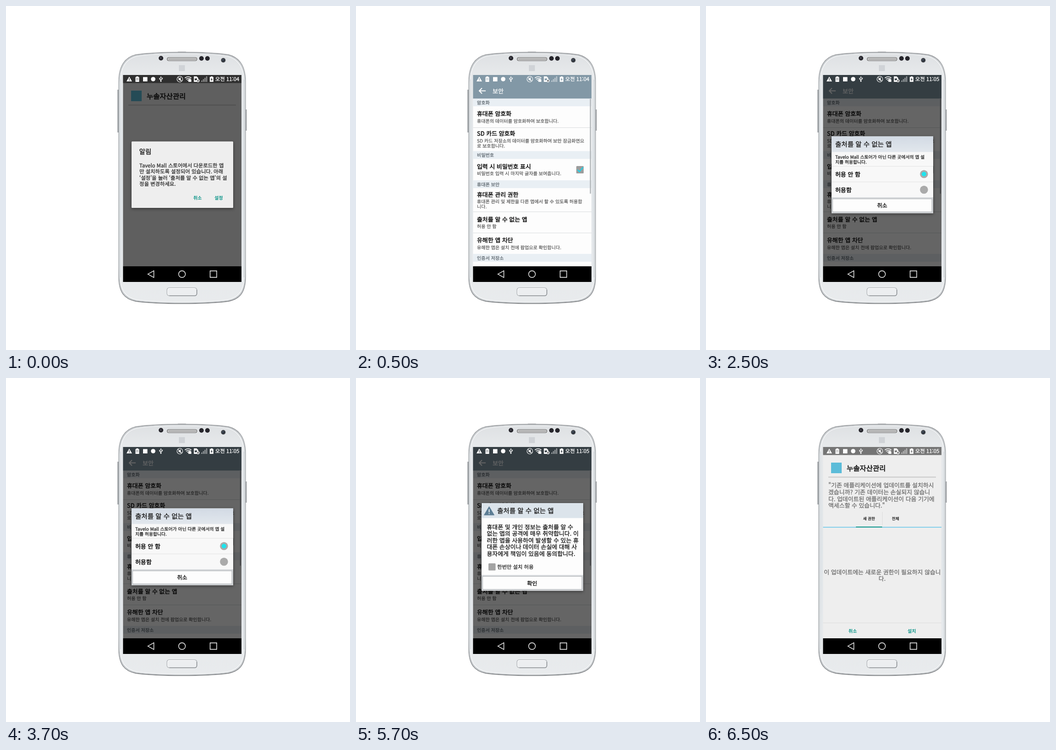
These frames come from a looping animation (748 by 748 pixels, 8 s). An HTML page:

```html
<!DOCTYPE html>
<html lang="ko">
<head>
<meta charset="utf-8">
<title>설치 안내</title>
<style>
html, body { margin: 0; width: 100%; height: 100%; overflow: hidden; background: #fff; }
svg { display: block; width: 100%; height: 100%; }
/* a thin stroke gives the regular weight a medium look */
text {
  font: 400 10.05px "Noto Sans CJK KR", "Noto Sans CJK", sans-serif;
  fill: var(--ink); stroke: var(--ink); stroke-width: .15px;
  text-rendering: geometricPrecision; --ink: #484848;
}
.mid { text-anchor: middle; }
.item { font-size: 12.9px; --ink: #080808; stroke-width: .45px; }
.sec { --ink: #59636b; stroke-width: .25px; }
.head { font-size: 14.5px; --ink: #1c1c1c; stroke-width: .35px; }
.note { font-size: 11.3px; --ink: #2c2c2c; stroke-width: .3px; }
.small { font-size: 9.8px; --ink: #222; stroke-width: .3px; }
.body { font-size: 12.9px; --ink: #1c1c1c; stroke-width: .35px; }
.soft { font-size: 12.85px; --ink: #6c6c6c; stroke-width: .3px; }
.btn { font-size: 12px; --ink: #111; stroke-width: .4px; }
.act { font-size: 10px; font-weight: 700; --ink: #0f968a; stroke: none; }
.tab { font-size: 8.6px; font-weight: 700; --ink: #222; stroke: none; }
.app { font-size: 15.4px; --ink: #161616; stroke-width: .6px; }
.title { font-size: 13px; --ink: #fff; stroke-width: .3px; }
.clock { font-size: 11.3px; --ink: #fff; stroke-width: .3px; }
.box { filter: drop-shadow(0 2px 3px rgba(0,0,0,.45)); }

/* each part is switched on and off in hard steps */
.show { animation: 8s step-end infinite; }
.installer { animation-name: installer; }
.details { animation-name: details; }
.settings { animation-name: settings; }
.dim { animation-name: dim; }
.blocked { animation-name: blocked; }
.choose { animation-name: choose; }
.confirm { animation-name: confirm; }
.early { animation-name: early; }
.late { animation-name: late; }
@keyframes installer { 0% { visibility: visible } 6.25% { visibility: hidden } 81.25%, 100% { visibility: visible } }
@keyframes details { 0% { visibility: hidden } 81.25%, 100% { visibility: visible } }
@keyframes settings { 0% { visibility: hidden } 6.25% { visibility: visible } 81.25%, 100% { visibility: hidden } }
@keyframes dim { 0% { visibility: visible } 6.25% { visibility: hidden } 31.25% { visibility: visible } 81.25%, 100% { visibility: hidden } }
@keyframes blocked { 0% { visibility: visible } 6.25%, 100% { visibility: hidden } }
@keyframes choose { 0% { visibility: hidden } 31.25% { visibility: visible } 56.25%, 100% { visibility: hidden } }
@keyframes confirm { 0% { visibility: hidden } 56.25% { visibility: visible } 81.25%, 100% { visibility: hidden } }
@keyframes early { 0% { visibility: visible } 31.25%, 100% { visibility: hidden } }
@keyframes late { 0% { visibility: hidden } 31.25%, 100% { visibility: visible } }
</style>
</head>
<body>
<svg viewBox="0 0 748 748">
<defs>
  <linearGradient id="shell" x2="0" y2="1">
    <stop offset="0" stop-color="#dfe1e4"/><stop offset=".08" stop-color="#e9ebed"/>
    <stop offset=".5" stop-color="#e2e7eb"/><stop offset="1" stop-color="#eceef0"/>
  </linearGradient>
  <linearGradient id="rim" x2="0" y2="1">
    <stop offset="0" stop-color="#909295"/><stop offset=".12" stop-color="#a4a8ac"/>
    <stop offset=".85" stop-color="#a4a8ac"/><stop offset="1" stop-color="#6a6d70"/>
  </linearGradient>
  <linearGradient id="bar" x2="0" y2="1">
    <stop offset="0" stop-color="#d2dae4"/><stop offset="1" stop-color="#e2e7ed"/>
  </linearGradient>
  <pattern id="grain" width="3" height="3" patternUnits="userSpaceOnUse">
    <path d="M0 0h1v1h-1zM1.5 1.5h1v1h-1z" fill="#d3d7db" opacity=".6"/>
  </pattern>
  <pattern id="mesh" width="3" height="3" patternUnits="userSpaceOnUse" x="353" y="114">
    <circle cx="1.5" cy="1.5" r="1" fill="#666"/>
  </pattern>
  <path id="body" d="M245 165C245 130 258 112 282 106C312 101.500 346 100.500 382 100.500C420 100.500 454 101.500 484 106C508 112 521 130 521 165V588C521 622 509 637 484 642C454 646 420 647 382 647C346 647 312 646 282 642C257 637 245 622 245 588Z"/>
  <clipPath id="screen"><rect x="254.500" y="150" width="257.500" height="416"/></clipPath>
</defs>

<!-- phone -->
<path d="M242.500 182h2.500v93h-2.500zM521 225h2.200v46h-2.200z" fill="#8b8f93"/>
<path d="M372 101l2-1.500h17l2 1.500z" fill="#8b8f93"/>
<use href="#body" fill="url(#shell)" stroke="url(#rim)" stroke-width="1.300"/>
<use href="#body" fill="none" stroke="#c3c7ca" stroke-width="1.800" transform="translate(383 374) scale(.989 .994) translate(-383 -374)"/>
<use href="#body" fill="url(#grain)" stroke="#f8f9fa" stroke-width="1.200" transform="translate(383 374) scale(.977 .988) translate(-383 -374)"/>
<path d="M249 160V590M517.500 160V590" stroke="#cdd3d8" fill="none"/>
<rect x="350.500" y="112" width="64.500" height="7" rx="3.500" fill="#d4d4d4" stroke="#626262" stroke-width="1.200"/>
<rect x="353" y="114" width="60" height="3" fill="url(#mesh)"/>
<g fill="#26252b">
  <circle cx="337" cy="113.500" r="5"/><circle cx="425" cy="114" r="5"/><circle cx="438" cy="114" r="5"/>
</g>
<circle cx="336.500" cy="113" r="2" fill="#4a4a52"/>
<circle cx="472.500" cy="118" r="5" fill="#43474d"/><circle cx="472.500" cy="118" r="2.600" fill="#1c2029"/>
<circle cx="472" cy="117.500" r="1.200" fill="#6b7d92"/>
<rect x="376" y="128.500" width="13" height="13" fill="#d0d3d7"/>
<rect x="350" y="612.500" width="65" height="17.500" rx="5" fill="#eceef0" stroke="#a9adb1" stroke-width="1.200"/>
<path d="M353 628.500q-1.500-1-1.500-4v-7q0-3.500 3.500-3.500h55" fill="none" stroke="#fff"/>
<path d="M355 630h56q4 0 4-5v-8" fill="none" stroke="#777b7f"/>

<!-- screens -->
<g clip-path="url(#screen)">
  <g class="show installer">
    <rect x="254" y="150" width="258" height="416" fill="#eee"/>
    <rect x="254" y="150" width="258" height="17.500" fill="#757575"/>
    <rect x="272" y="184" width="23" height="23" fill="#5cbcd9"/>
    <text class="app" x="306" y="201.500">누솔자산관리</text>
    <path d="M266 215.500H500" stroke="#c9c9c9" stroke-width="2"/>
  </g>
  <g class="show details">
    <text class="soft" x="266" y="238.200">"기존 애플리케이션에 업데이트를 설치하시</text>
    <text class="soft" x="266" y="252.900">겠습니까? 기존 데이터는 손실되지 않습니</text>
    <text class="soft" x="266" y="267.600">다. 업데이트된 애플리케이션이 다음 기기에</text>
    <text class="soft" x="266" y="282.300">액세스할 수 있습니다."</text>
    <text class="tab mid" x="354.500" y="309">새 권한</text>
    <text class="tab mid" x="412" y="309">전체</text>
    <path d="M383.500 291v29M254 532.500h258" stroke="#dcdcdc"/>
    <path d="M254 324.500h258" stroke="#5fc4e8" stroke-width="1.300"/>
    <path d="M326 324h57" stroke="#17998c" stroke-width="2"/>
    <text class="soft mid" x="383.500" y="426.500">이 업데이트에는 새로운 권한이 필요하지 않습니</text>
    <text class="soft mid" x="383" y="441.200">다.</text>
    <text class="act mid" x="319" y="553.500">취소</text>
    <text class="act mid" x="447.500" y="553.500">설치</text>
  </g>

  <g class="show settings">
    <rect x="254" y="150" width="258" height="416" fill="#fdfdfd"/>
    <rect x="254" y="150" width="258" height="51.500" fill="#8298a6"/>
    <path d="M282 184.500h-14M274 178.500l-6 6l6 6" fill="none" stroke="#fff" stroke-width="2"/>
    <text class="title" x="297" y="189.500">보안</text>
    <path d="M254 201.500h258v16.500h-258zM254 315.500h258v17h-258zM254 379h258v17h-258zM254 539h258v17h-258z" fill="#e9eff4"/>
    <path d="M254 264.500h258M254 447.500h258M254 493.500h258" stroke="#d9dcde"/>
    <text class="sec" x="263" y="213.700">암호화</text>
    <text class="item" x="263" y="239.200">휴대폰 암호화</text>
    <text x="263" y="253.700">휴대폰의 데이터를 암호화하여 보호합니다.</text>
    <text class="item" x="263" y="282.200">SD 카드 암호화</text>
    <text x="263" y="296.500">SD 카드 저장소의 데이터를 암호화하여 보안 잠금화면으</text>
    <text x="263" y="307.700">로 보호합니다.</text>
    <text class="sec" x="263" y="328">비밀번호</text>
    <text class="item" x="263" y="354">입력 시 비밀번호 표시</text>
    <text x="263" y="368.300">비밀번호 입력 시 마지막 글자를 보여줍니다.</text>
    <rect x="479" y="348" width="16" height="16" rx="1.500" fill="#9d9d9d"/>
    <path d="M481.500 356l4.300 4.300l8-9.500" fill="none" stroke="#1fd3e8" stroke-width="2.300"/>
    <text class="sec" x="263" y="391.500">휴대폰 보안</text>
    <text class="item" x="263" y="414.500">휴대폰 관리 권한</text>
    <text x="263" y="428.700">휴대폰 관리 및 제한을 다른 앱에서 할 수 있도록 허용합</text>
    <text x="263" y="440.300">니다.</text>
    <text class="item" x="263" y="469">출처를 알 수 없는 앱</text>
    <text x="263" y="483.300">허용 안 함</text>
    <text class="item" x="263" y="514.300">유해한 앱 차단</text>
    <text x="263" y="528.500">유해한 앱은 설치 전에 팝업으로 확인합니다.</text>
    <text class="sec" x="263" y="552">인증서 저장소</text>
    <rect x="508.500" y="202" width="2.500" height="206" fill="#b4b8bb"/>
  </g>

  <rect class="show dim" x="254" y="150" width="258" height="416" opacity=".6"/>

  <g class="show blocked">
    <rect class="box" x="273" y="294.500" width="221" height="144.500" rx="1.500" fill="#eee"/>
    <text class="head" x="289.500" y="322">알림</text>
    <text class="note" x="290" y="351">Tavelo Mall 스토어에서 다운로드한 앱</text>
    <text class="note" x="290" y="364.300">만 설치하도록 설정되어 있습니다. 아래</text>
    <text class="note" x="290" y="377.600">‘설정’을 눌러 ‘출처를 알 수 없는 앱’의 설</text>
    <text class="note" x="290" y="390.900">정을 변경하세요.</text>
    <text class="act mid" x="416.500" y="420.700">취소</text>
    <text class="act mid" x="462.500" y="420.700">설정</text>
  </g>

  <g class="show choose">
    <rect class="box" x="273" y="283.500" width="221" height="167" fill="#f8f8f8"/>
    <rect x="273" y="283.500" width="221" height="34" fill="url(#bar)"/>
    <text class="head" x="281" y="306.300">출처를 알 수 없는 앱</text>
    <text class="small" x="281" y="331.500">Tavelo Mall 스토어가 아닌 다른 곳에서의 앱 설</text>
    <text class="small" x="281" y="343">치를 허용합니다.</text>
    <path d="M273 348.500h221M273 382.500h221" stroke="#e3e3e3"/>
    <text class="item" x="281" y="370.500">허용 안 함</text>
    <text class="item" x="281" y="404.700">허용함</text>
    <circle cx="474" cy="365.500" r="8.700" fill="#aaa"/><circle cx="474" cy="365.500" r="5" fill="#1de4ee"/>
    <circle cx="474" cy="399.500" r="8.700" fill="#aaa"/>
    <rect x="273" y="416" width="221" height="34.500" fill="#d3d6d9"/>
    <rect x="275.500" y="419.500" width="215.500" height="28" fill="#fdfdfd" stroke="#b5b8bb"/>
    <text class="btn mid" x="383" y="438">취소</text>
  </g>

  <g class="show confirm">
    <rect class="box" x="273" y="272" width="221" height="190.500" fill="#fdfdfd"/>
    <rect x="273" y="272" width="221" height="32.500" fill="#dce4eb"/>
    <path d="M289.500 279.500l11 18.500h-22z" fill="#5c7d94" stroke="#5c7d94" stroke-linejoin="round"/>
    <path d="M289.500 285.500v6.500M289.500 293.800v2" stroke="#fff" stroke-width="1.800"/>
    <text class="head" x="307" y="294.300">출처를 알 수 없는 앱</text>
    <text class="body" x="284.500" y="328.600">휴대폰 및 개인 정보는 출처를 알 수</text>
    <text class="body" x="284.500" y="343.200">없는 앱의 공격에 매우 취약합니다. 이</text>
    <text class="body" x="284.500" y="357.800">러한 앱을 사용하여 발생할 수 있는 휴</text>
    <text class="body" x="284.500" y="372.400">대폰 손상이나 데이터 손실에 대해 사</text>
    <text class="body" x="284.500" y="387">용자에게 책임이 있음에 동의합니다.</text>
    <rect x="288" y="403" width="15.500" height="15.500" rx="1.500" fill="#a3a3a3"/>
    <text class="note" x="307" y="415.300">한번만 설치 허용</text>
    <rect x="273" y="428.500" width="221" height="34" fill="#d3d6d9"/>
    <rect x="275.500" y="431.500" width="215.500" height="28" fill="#fdfdfd" stroke="#b5b8bb"/>
    <text class="btn mid" x="383" y="450.500">확인</text>
  </g>
</g>

<!-- status icons -->
<g fill="#fff">
  <path fill-rule="evenodd" d="M268 153.500l6 10.500h-12zM267.300 157v3.700h1.400v-3.700zM267.300 161.500v1.300h1.400v-1.300z"/>
  <path fill-rule="evenodd" d="M283.500 153h4v1.500h2v10.500h-8v-10.500h2zM283 157v.8h5v-.8zM283 160v.8h5v-.8z"/>
  <rect x="298" y="154.500" width="9.500" height="9.500"/>
  <circle cx="320" cy="159" r="4.800"/>
  <path d="M336.800 153l1.800 2.500h-3.600zM333 156.500h2v2h-2zM338.800 156h2v2h-2z"/>
  <circle cx="336.800" cy="163.500" r="1.400"/>
  <path d="M375.300 157h2l2.500-2.200v8.400l-2.500-2.200h-2z"/>
  <path d="M396.500 160h6.500v5h-6.500z"/>
  <path fill-rule="evenodd" d="M408.500 153h6l3.500 3.500v8.500h-9.500zM410.500 157.500v4h5v-4z"/>
  <circle cx="417.500" cy="162.500" r="3.300"/>
  <path fill-rule="evenodd" d="M445.500 153h3.500v1.300h2v10.700h-8v-10.700h2.500zM447.800 155.800l-3 4.400h2l-.6 3.300l3.200-4.500h-2.100z"/>
  <path opacity=".45" d="M424.500 162h2.500v3h-2.500zM428 159h2.500v6h-2.500zM431.500 156h2.500v9h-2.500zM435 153h2.500v12h-2.500z"/>
</g>
<g fill="none" stroke="#fff" stroke-width="1.100">
  <path d="M336.800 154v9.500M334 158v1.500l2.800 2M339.800 157.500v1.500l-3 2"/>
  <circle cx="378" cy="159" r="6.200"/><path d="M373.600 154.600l8.800 8.800"/>
  <path d="M389 156.500q7-5.500 14 0M391.500 159.300q4.500-3.500 9 0M394 162q1.500-1.200 2.500-1.200" stroke-width="1.600"/>
  <path d="M398 160v-1.200q1.700-2 3.500 0v1.200"/>
  <path d="M416 161l3 3M419 161l-3 3" stroke="#444"/>
</g>
<text class="clock show early" x="455" y="163.200">오전 11:04</text>
<text class="clock show late" x="455" y="163.200">오전 11:05</text>

<!-- navigation bar -->
<rect x="254.500" y="566" width="257.500" height="34"/>
<g fill="none" stroke="#fff" stroke-width="1.400">
  <path d="M308.500 583l13-7.300v14.600z"/><circle cx="382.700" cy="583" r="7.300"/><path d="M443.800 576h14.400v14h-14.400z"/>
</g>
</svg>
</body>
</html>
```
